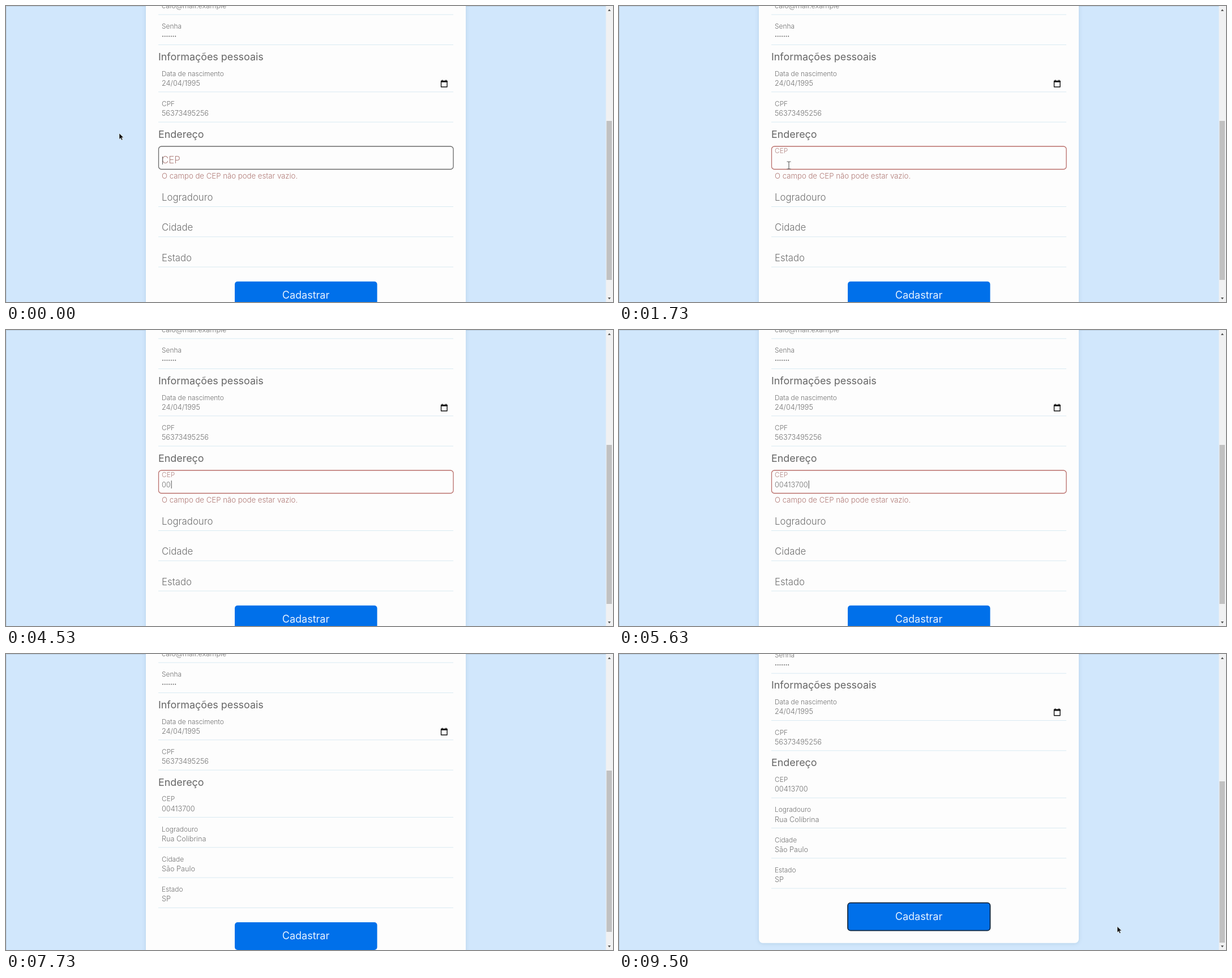
Animation, 1072 px wide and 523 px high, one loop 9.53 s. Source, as an HTML page:

```html
<!DOCTYPE html>
<html lang="pt-BR">
<head>
<meta charset="utf-8">
<title>Cadastro</title>
<style>
  html, body { margin: 0; width: 100%; height: 100%; overflow: hidden; background: #d1e7fc; }
  svg { display: block; width: 1072px; height: 523px; font-family: Inter, "Open Sans", sans-serif; font-weight: 300; }
  .card { fill: #fdfdfd; filter: drop-shadow(0 1px 3px #b4d0e8); }
  .title { font-size: 17.9px; font-weight: 400; fill: #666; }
  .label { fill: #707070; }
  .value { font-size: 12.7px; fill: #727272; }
  .rule { stroke: #d9eaf2; }
  .error { font-size: 13.2px; fill: #b07a76; }
  .caret { stroke: #555; }
  .send { fill: #0070ea; }
  .send-text { font-size: 18px; font-weight: 400; fill: #e8f3ff; text-anchor: middle; }
</style>
</head>
<body>
<svg viewBox="0 0 1072 523">
  <rect width="1072" height="523" fill="#d1e7fc"/>
  <path d="M0.5 523V0.5H1060" fill="none" stroke="#b9cde0"/>
  <g id="page">
    <rect class="card" x="247" y="-100" width="565" height="645" rx="7"/>
    <text class="title" x="269" y="95.5">Informações pessoais</text>
    <text class="title" x="269" y="232.5">Endereço</text>
    <path d="M277 53.5h23" stroke="#666" stroke-width="2" stroke-linecap="round" stroke-dasharray="0 3.7"/>
    <path d="M768.500 132.500h10.500v10.500h-10.500z" fill="none" stroke="#111" stroke-width="1.400" stroke-linejoin="round"/>
    <path d="M768 132h11.500v2.800h-11.500zM769.700 130.500h1.500v2h-1.500zM776.300 130.500h1.500v2h-1.500z" fill="#111"/>
    <g id="fixed"></g>
    <g id="alert">
      <rect id="box" x="269.500" y="248" width="520.500" height="40.500" rx="5" fill="none" stroke-width="1.300"/>
      <text class="error" x="275" y="305">O campo de CEP não pode estar vazio.</text>
    </g>
    <g id="lower">
      <rect id="send" class="send" x="404" y="486.700" width="251.500" height="49" rx="5"/>
      <text class="send-text" x="529.500" y="517">Cadastrar</text>
    </g>
    <path id="caret" class="caret"/>
  </g>
  <rect x="1059.500" width="12.500" height="523" fill="#f0f1f2"/>
  <path d="M1063 9l2.500-3.500L1068 9zM1063 515l2.500 3.500L1068 515z" fill="#555"/>
  <rect id="thumb" x="1060.500" width="9.500" fill="#c1c1c1"/>
  <path id="arrow" d="M0 0v10.500l2.400-2.200 1.700 3.800 1.900-.8-1.700-3.700h3.300z" fill="#111" stroke="#fff" stroke-width=".5"/>
  <path id="beam" d="M-3.500-6.500h2.500l1 1 1-1h2.500M0-5.500v11M-3.500 6.500h2.500l1-1 1 1h2.500" fill="none" stroke="#666" stroke-width="1.200"/>
</svg>
<script>
const LOOP = 9530, TYPE = 4250, KEY = 190, LEAVE = 6200, FILL = 6450, SUBMIT = 7800;
const ZIP = '00413700';
const $ = id => document.getElementById(id);

function add(parent, tag, attrs, text = '') {
  const el = document.createElementNS('http://www.w3.org/2000/svg', tag);
  set(el, attrs);
  el.textContent = text;
  return parent.appendChild(el);
}
function set(el, attrs) {
  for (const key in attrs) el.setAttribute(key, attrs[key]);
}
const show = (el, on) => el.setAttribute('visibility', on ? 'visible' : 'hidden');
const mix = (a, b, k) => a + (b - a) * k;
const ease = (t, from, to) => {
  const k = Math.min(1, Math.max(0, (t - from) / (to - from)));
  return k * k * (3 - 2 * k);
};

// y is the underline; the label floats above the value when k reaches 1
function field(parent, y, name, text) {
  const rule = add(parent, 'path', { class: 'rule', d: `M269 ${y + .5}H790` });
  const label = add(parent, 'text', { class: 'label', x: 275 }, name);
  const value = add(parent, 'text', { class: 'value', x: 275, y: y - 10.5 }, text);
  const float = k => set(label, { y: mix(y - 10, y - 27.7, k), 'font-size': mix(16.8, 11.9, k) });
  float(1);
  return { rule, label, value, float };
}

const fixed = $('fixed'), lower = $('lower');
field(fixed, 14.7, 'Email', 'caio@mail.example');
field(fixed, 68, 'Senha', '');
field(fixed, 151.3, 'Data de nascimento', '24/04/1995');
field(fixed, 204.6, 'CPF', '56373495256');
const zip = field(fixed, 288, 'CEP', '');
const street = field(lower, 354, 'Logradouro', 'Rua Colibrina');
const city = field(lower, 407.3, 'Cidade', 'São Paulo');
const state = field(lower, 460.6, 'Estado', 'SP');

function draw(t) {
  const left = t >= LEAVE, filled = t >= FILL, sent = t >= SUBMIT;
  const lift = ease(t, 0, 200);

  zip.float(lift);
  zip.label.style.fill = left ? '' : '#b08480';
  const typed = Math.max(0, Math.floor((t - TYPE) / KEY) + 1);
  zip.value.textContent = ZIP.slice(0, typed);
  show(zip.rule, left);
  show($('alert'), !left);
  set($('box'), { stroke: `rgb(${mix(105, 185, lift)},${mix(105, 110, lift)},${mix(105, 106, lift)})` });

  set(lower, { transform: `translate(0 ${left ? -12.7 : 0})` });
  street.float(ease(t, LEAVE, LEAVE + 200));
  for (const f of [city, state]) f.float(ease(t, FILL, FILL + 200));
  for (const f of [street, city, state]) show(f.value, filled);
  set($('send'), { stroke: sent ? '#10283f' : 'none', 'stroke-width': 1.8 });

  // the caret stays solid while keys are pressed
  const active = left ? street : zip;
  const typing = t >= TYPE && t < TYPE + KEY * ZIP.length;
  const blink = typing || (left ? t - LEAVE : t) % 1000 < 500;
  const x = 276.5 + (!left || filled ? active.value.getComputedTextLength() : 0);
  set($('caret'), { d: `M${x} ${left ? 319 : 266}v14` });
  show($('caret'), blink && !sent);

  const bottom = ease(t, 9000, 9450);
  const scroll = sent ? mix(1, 34.3, bottom) : 0;
  set($('page'), { transform: `translate(0 ${-scroll})` });
  set($('thumb'), { y: left ? mix(206, 225, bottom) : 203, height: left ? 285 : 281 });

  const into = ease(t, 500, 1450), away = ease(t, 8700, 9450);
  const late = t >= 8200;
  const mx = late ? mix(163, 880, away) : mix(200, 300, into);
  const my = late ? mix(337, 481.5, away) : mix(225, 281.5, into) - 2 * ease(t, 2000, 2600);
  const overText = !late && mx > 269 && my > 248;
  for (const id of ['arrow', 'beam']) set($(id), { transform: `translate(${mx} ${my})` });
  show($('arrow'), late || (t < TYPE && !overText));
  show($('beam'), t < TYPE && overText);
}

const start = performance.now();
function tick() {
  draw((performance.now() - start) % LOOP);
  requestAnimationFrame(tick);
}
tick();
</script>
</body>
</html>
```
